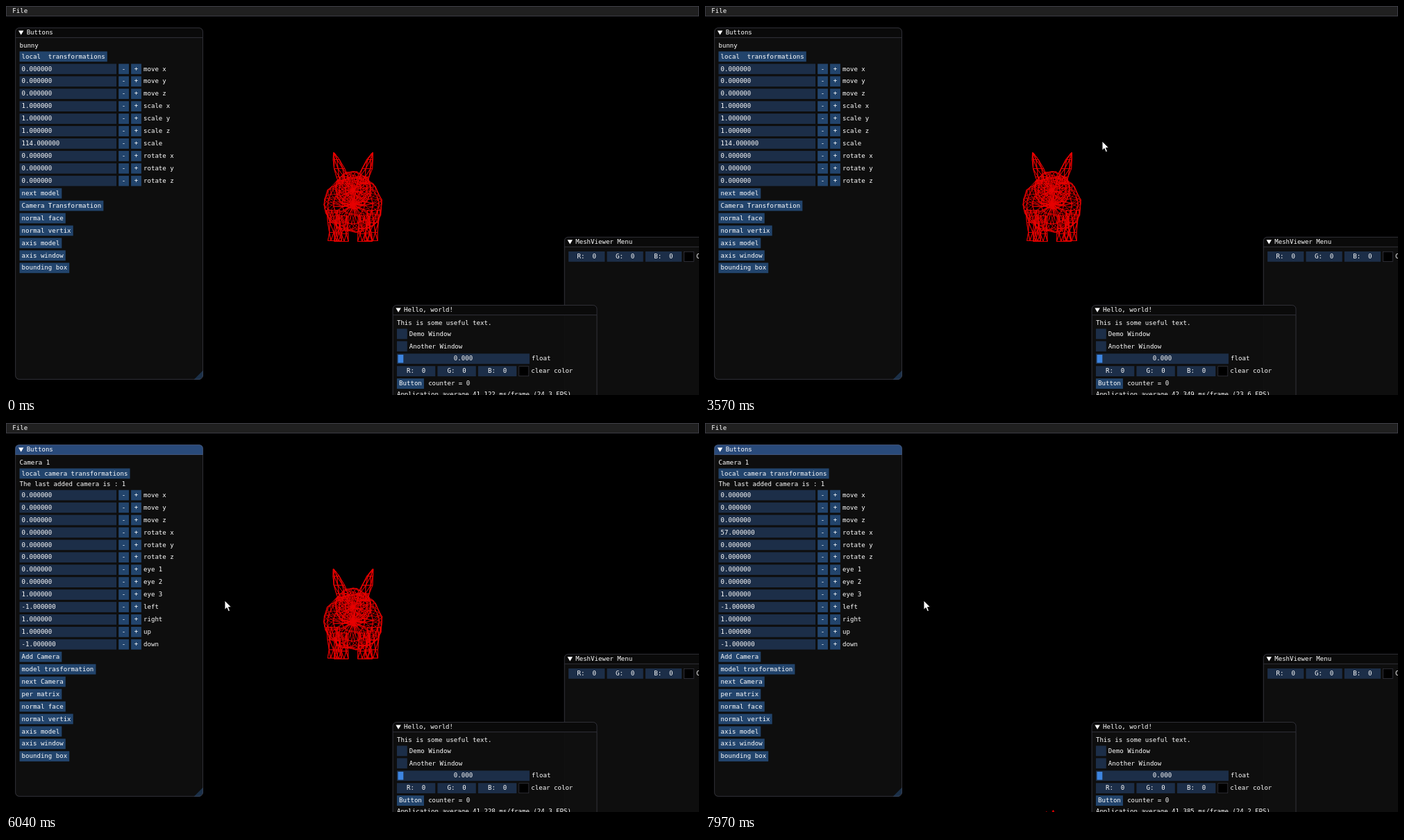
These frames come from a looping animation (998x561 px, 8 s). An HTML page with a canvas:

```html
<!DOCTYPE html>
<html lang="en">
<head>
<meta charset="utf-8">
<title>Mesh viewer</title>
<style>
html, body { margin: 0; width: 100%; height: 100%; overflow: hidden; background: #000; }
canvas { display: block; }
</style>
</head>
<body>
<canvas id="stage" width="998" height="561"></canvas>
<script>
const ctx = document.getElementById('stage').getContext('2d');
const LOOP = 8000;
const SCALE = 998 / 1280; // interface is laid out on a 1280 x 720 grid
const PRESS = 5150, FOCUS = 5195, RELEASE = 5290;
const SPIN_START = 7190, SPIN_STEP = 40.9;

const COLOR = {
  text: '#fff', border: 'rgba(110,110,128,.5)', window: 'rgba(15,15,15,.94)',
  title: '#0a0a0a', titleActive: '#294a7a', frame: 'rgba(41,74,122,.54)',
  button: 'rgba(66,150,250,.4)', hover: '#4296fa', active: '#0f87fa',
  grip: 'rgba(66,150,250,.25)', grab: '#3d85e0', mesh: '#e80000'
};

const MODEL_ROWS = ['move x', 'move y', 'move z', 'scale x', 'scale y', 'scale z', 'scale',
  'rotate x', 'rotate y', 'rotate z'];
const MODEL_VALUES = [0, 0, 0, 1, 1, 1, 114, 0, 0, 0];
const CAMERA_ROWS = ['move x', 'move y', 'move z', 'rotate x', 'rotate y', 'rotate z',
  'eye 1', 'eye 2', 'eye 3', 'left', 'right', 'up', 'down'];
const CAMERA_VALUES = [0, 0, 0, 0, 0, 0, 0, 0, 1, -1, 1, 1, -1];
const SHARED = ['normal face', 'normal vertix', 'axis model', 'axis window', 'bounding box'];

// time, x, y
const POINTER = [[600, 590, -25], [1150, 534, 129], [1350, 534, 129], [2300, 548, 152],
  [3500, 572, 195], [4250, 572, 195], [5050, 63, 284], [5300, 63, 284], [5950, 315, 256]];
// time, milliseconds per drawn frame
const SPEED = [[0, 41.121], [1300, 42.346], [3570, 42.349], [5170, 41.675],
  [6040, 41.229], [7440, 40.399], [7970, 41.385]];

const smooth = u => u * u * (3 - 2 * u);
const clamp = (v, lo, hi) => Math.max(lo, Math.min(hi, v));

function sample(keys, t, ease = u => u) {
  const i = keys.findIndex(k => k[0] > t);
  if (i === 0) return keys[0].slice(1);
  if (i < 0) return keys[keys.length - 1].slice(1);
  const a = keys[i - 1], b = keys[i];
  const u = ease((t - a[0]) / (b[0] - a[0]));
  return a.slice(1).map((v, n) => v + (b[n + 1] - v) * u);
}

// ---- wireframe rabbit: x right, y down, z away from the viewer ----
let seed = 11;
const random = () => (seed = (seed * 16807) % 2147483647) / 2147483647;
const jitter = n => (random() - .5) * n;
const edges = [];

// sections: [x, y, z, radius x, second radius]
function loft(sections, count, alongZ, wobble) {
  const rings = sections.map(([x, y, z, rx, r2], k) =>
    Array.from({ length: count }, (_, i) => {
      const a = (i + (k % 2) / 2) / count * Math.PI * 2;
      const c = Math.cos(a) * rx, s = Math.sin(a) * r2;
      const j = () => jitter(Math.min(wobble, rx));
      return alongZ ? [x + c + j() * .3, y + s + j(), z + j() * 3]
                    : [x + c + j() * .3, y, z + s + j()];
    }));
  rings.forEach((ring, k) => ring.forEach((p, i) => {
    edges.push([p, ring[(i + 1) % count]]);
    const next = rings[k + 1];
    if (next) edges.push([p, next[i]], [p, next[(i + (k % 2 ? 1 : count - 1)) % count]]);
  }));
}

function blob(y, z, rx, ry, rz, steps, count, power) {
  loft(Array.from({ length: steps + 1 }, (_, i) => {
    const a = i / steps * Math.PI, r = Math.sin(a) ** power || 0;
    return [0, y, z - rz * Math.cos(a), rx * r, ry * r];
  }), count, true, 5);
}

blob(6, 452, 42, 40, 121, 9, 19, .9);
blob(-15, 520, 26, 27, 34, 7, 14, 1);
for (const side of [-1, 1]) {
  const part = (list, count) =>
    loft(list.map(([x, ...rest]) => [x * side, ...rest]), count, false, 3);
  part([[28, -69, 523, .5, .5], [24, -59, 521, 4.5, 4], [20, -46, 516, 8, 5],
    [15, -34, 510, 9, 6], [13, -24, 505, 8, 6]], 7);
  part([[29, 14, 478, 10, 24], [28, 32, 482, 9, 20], [26, 46, 488, 9, 15], [26, 58, 492, 10, 12]], 7);
  part([[16, 22, 530, 8, 10], [16, 40, 535, 9, 9], [17, 48, 538, 10, 10], [17, 59, 538, 11, 9]], 8);
}

function drawRabbit(degrees, zoom) {
  const a = degrees * Math.PI / 180, c = Math.cos(a), s = Math.sin(a);
  const px = p => 500 + p[0] * zoom;
  const py = p => 280.5 + (p[1] * c + p[2] * s) * zoom;
  ctx.beginPath();
  for (const [p, q] of edges) {
    ctx.moveTo(px(p), py(p));
    ctx.lineTo(px(q), py(q));
  }
  ctx.strokeStyle = COLOR.mesh;
  ctx.lineWidth = .85;
  ctx.stroke();
}

// ---- interface ----
let mouse = [0, 0], pressed = false;

function rect(x, y, w, h, color) {
  ctx.fillStyle = color;
  ctx.fillRect(x, y, w, h);
}

function poly(points, color) {
  ctx.beginPath();
  points.forEach(([x, y]) => ctx.lineTo(x, y));
  ctx.closePath();
  ctx.fillStyle = color;
  ctx.fill();
}

function text(str, x, y) {
  ctx.fillStyle = COLOR.text;
  ctx.fillText(str, x, y + 10);
}

function button(label, x, y, w = label.length * 7 + 8) {
  const [mx, my] = mouse;
  const over = mx >= x && mx < x + w && my >= y && my < y + 19;
  rect(x, y, w, 19, over ? (pressed ? COLOR.active : COLOR.hover) : COLOR.button);
  text(label, x + (w - label.length * 7) / 2, y + 3);
}

function field(label, x, y, w, centered) {
  rect(x, y, w, 19, COLOR.frame);
  text(label, centered ? x + (w - label.length * 7) / 2 : x + 4, y + 3);
}

function numberRow(label, value, y) {
  field(value.toFixed(6), 25, y, 179);
  button('-', 208, y, 19);
  button('+', 231, y, 19);
  text(label, 254, y + 3);
}

function colorRow(x, y, w, step, label) {
  ['R', 'G', 'B'].forEach((name, i) => field(name + ':  0', x + i * step, y, w, true));
  const sx = x + 3 * step;
  rect(sx, y, 19, 19, '#000');
  ctx.strokeStyle = COLOR.border;
  ctx.strokeRect(sx + .5, y + .5, 18, 18);
  text(label, sx + 23, y + 3);
}

function panel(title, x, y, w, h, focused) {
  ctx.lineWidth = 1;
  ctx.beginPath();
  ctx.roundRect(x, y, w, h, 7);
  ctx.fillStyle = COLOR.window;
  ctx.fill();
  ctx.beginPath();
  ctx.roundRect(x, y, w, 19, [7, 7, 0, 0]);
  ctx.fillStyle = focused ? COLOR.titleActive : COLOR.title;
  ctx.fill();
  poly([[x + w, y + h - 17], [x + w, y + h - 6], [x + w - 6, y + h], [x + w - 17, y + h]], COLOR.grip);
  ctx.strokeStyle = COLOR.border;
  ctx.beginPath();
  ctx.roundRect(x + .5, y + .5, w - 1, h - 1, 7);
  ctx.moveTo(x + 1, y + 18.5);
  ctx.lineTo(x + w - 1, y + 18.5);
  ctx.stroke();
  poly([[x + 6, y + 5.5], [x + 15.5, y + 5.5], [x + 10.75, y + 13.5]], COLOR.text);
  text(title, x + 21, y + 3);
}

function drawMenuBar() {
  rect(0, 0, 1280, 19, '#202020');
  ctx.lineWidth = 1;
  ctx.strokeStyle = COLOR.border;
  ctx.strokeRect(.5, .5, 1279, 18);
  text('File', 12, 3);
}

function drawButtonsPanel(camera, focused, angle) {
  panel('Buttons', 17, 40, 347, 651, focused);
  text(camera ? 'Camera 1' : 'bunny', 25, 67);
  button(camera ? 'local camera transformations' : 'local  transformations', 25, 84);
  if (camera) text('The last added camera is : 1', 25, 107);
  let y = camera ? 124 : 107;
  const rows = camera ? CAMERA_ROWS : MODEL_ROWS;
  const values = camera ? CAMERA_VALUES : MODEL_VALUES;
  rows.forEach((label, i) => {
    numberRow(label, camera && label === 'rotate x' ? angle : values[i], y);
    y += 23;
  });
  const own = camera ? ['Add Camera', 'model trasformation', 'next Camera', 'per matrix']
                     : ['next model', 'Camera Transformation'];
  for (const label of [...own, ...SHARED]) {
    button(label, 25, y);
    y += 23;
  }
}

function drawViewerPanel() {
  panel('MeshViewer Menu', 1031, 427, 400, 400);
  colorRow(1039, 454, 67, 71, 'Clear color');
}

function drawHelloPanel(ms) {
  panel('Hello, world!', 714, 553, 378, 260);
  text('This is some useful text.', 722, 580);
  ['Demo Window', 'Another Window'].forEach((label, i) => {
    rect(722, 597 + i * 23, 19, 19, COLOR.frame);
    text(label, 745, 600 + i * 23);
  });
  field('0.000', 722, 643, 245, true);
  rect(724, 645, 10, 15, COLOR.grab);
  text('float', 971, 646);
  colorRow(722, 666, 71, 75, 'clear color');
  button('Button', 722, 689);
  text('counter = 0', 780, 692);
  text(`Application average ${ms.toFixed(3)} ms/frame (${(1000 / ms).toFixed(1)} FPS)`, 722, 712);
}

function drawPointer() {
  ctx.save();
  ctx.translate(...mouse);
  ctx.lineWidth = 1.2;
  ctx.strokeStyle = '#000';
  poly([[0, 0], [0, 17], [4, 13.5], [6.7, 20], [9.6, 18.8], [7, 12.5], [12.3, 12.3]], '#fff');
  ctx.stroke();
  ctx.restore();
}

function draw(now) {
  const t = now % LOOP;
  const camera = t >= RELEASE;
  const angle = 3 * clamp(Math.floor((t - SPIN_START) / SPIN_STEP), 0, 19);
  mouse = sample(POINTER, t, smooth).map(v => v / SCALE);
  pressed = t >= PRESS && t < RELEASE;

  ctx.setTransform(1, 0, 0, 1, 0, 0);
  rect(0, 0, 998, 561, '#000');
  drawRabbit(angle, camera ? 1.01 : 1);

  ctx.setTransform(SCALE, 0, 0, SCALE, 0, 0);
  ctx.font = '11.63px "DejaVu Sans Mono", monospace';
  drawMenuBar();
  drawViewerPanel();
  drawHelloPanel(sample(SPEED, t)[0]);
  drawButtonsPanel(camera, t >= FOCUS, angle);
  drawPointer();
}

const start = performance.now();
function tick() {
  draw(performance.now() - start);
  requestAnimationFrame(tick);
}
tick();
</script>
</body>
</html>
```
